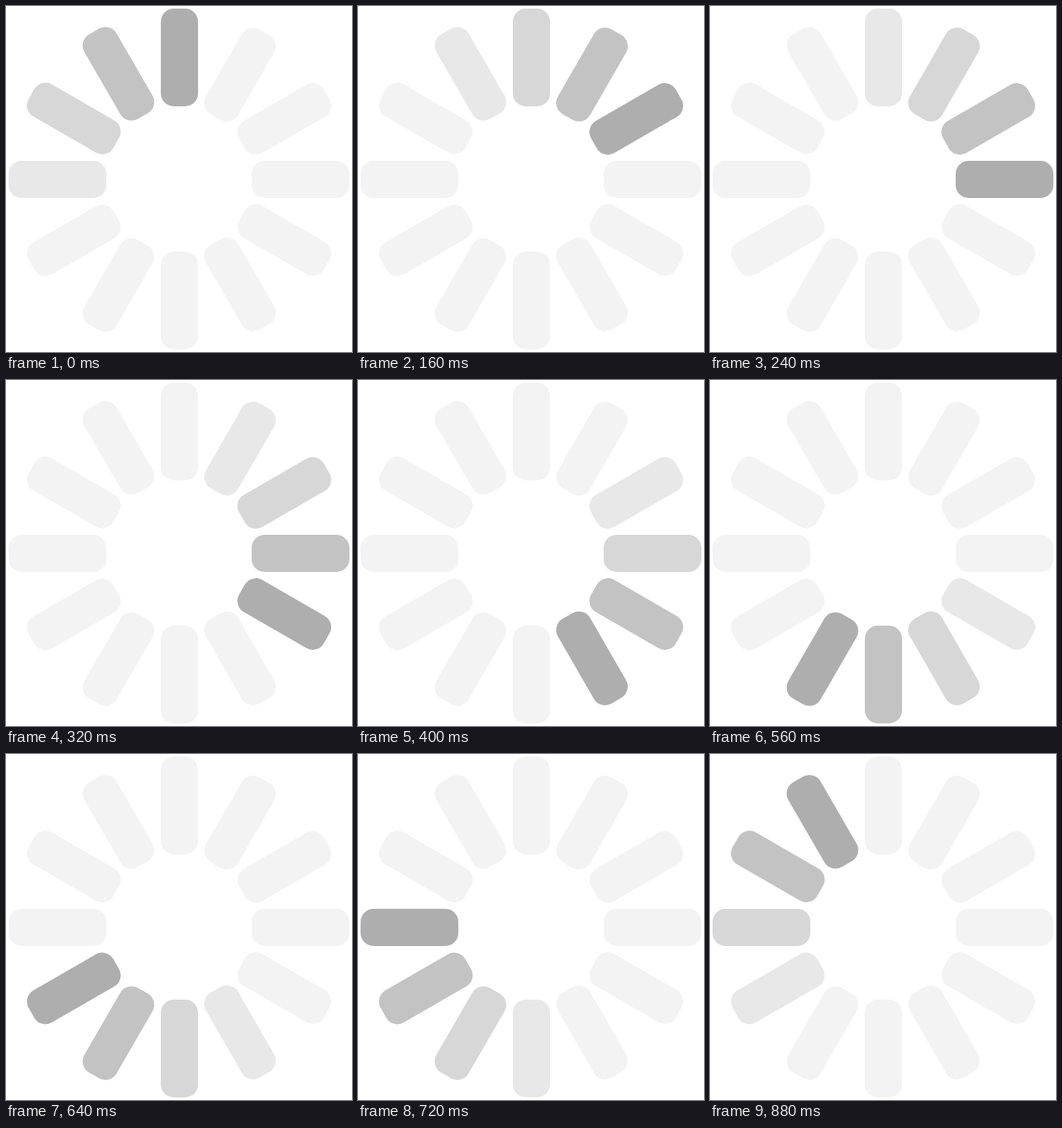
An HTML page for the animation above (0.96 s loop, 400x400 px).

```html
<!DOCTYPE html>
<html>
<head>
<meta charset="utf-8">
<title>Spinner</title>
<style>
  html, body { margin: 0; width: 100%; height: 100%; overflow: hidden; background: #fff; }
  svg { display: block; width: 100vw; height: 100vh; }
</style>
</head>
<body>
<svg viewBox="0 0 400 400"></svg>
<script>
  const COUNT = 12, STEP_MS = 80;
  const TAIL = ['#aeaeae', '#c3c3c3', '#d7d7d7', '#e8e8e8'], IDLE = '#f3f3f3';
  const svg = document.querySelector('svg');

  const bars = Array.from({ length: COUNT }, (_, i) => {
    const bar = document.createElementNS('http://www.w3.org/2000/svg', 'rect');
    // The right and bottom bars sit one pixel closer to the centre.
    const reach = i >= 1 && i <= 6 ? 196.5 : 197.5;
    const attrs = {
      x: -21.5, y: -reach, width: 43, height: 113, rx: 15,
      transform: `translate(200.5 200.5) rotate(${i * 360 / COUNT})`
    };
    for (const name in attrs) bar.setAttribute(name, attrs[name]);
    return svg.appendChild(bar);
  });

  function draw(now) {
    const head = Math.floor(now / STEP_MS) % COUNT;
    bars.forEach((bar, i) => {
      const age = (head - i + COUNT) % COUNT;
      bar.setAttribute('fill', TAIL[age] || IDLE);
    });
  }

  let start;
  function tick(now) {
    start ??= now;
    draw(now - start);
    requestAnimationFrame(tick);
  }
  draw(0);
  requestAnimationFrame(tick);
</script>
</body>
</html>
```
